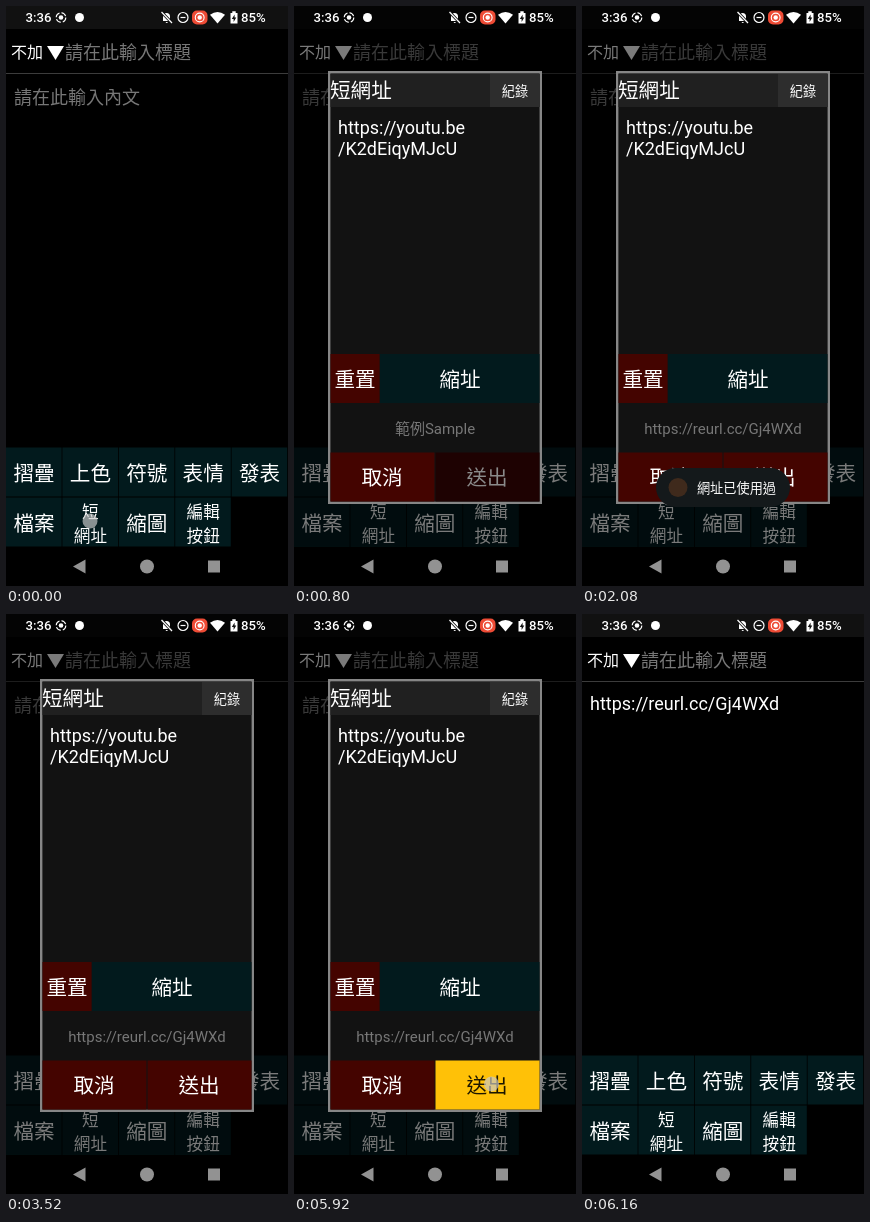
An HTML page that plays this animation: 282x580 px, repeating every 6960 ms.

```html
<!DOCTYPE html>
<html lang="zh-Hant">
<head>
<meta charset="utf-8">
<style>
html, body { margin: 0; width: 100%; height: 100%; overflow: hidden; background: #000; }
svg { display: block; width: 282px; height: 580px; }
text { font-family: Roboto, "Noto Sans CJK TC", "Noto Sans CJK JP", "Noto Sans CJK", sans-serif; }
</style>
</head>
<body>
<svg id="stage" viewBox="0 0 282 580"></svg>
<script>
const LOOP = 6960;
const TEAL = '#021a1d', RED = '#440400', GREY = '#777';
const stage = document.getElementById('stage');

function add(parent, tag, attrs, content) {
  const el = document.createElementNS('http://www.w3.org/2000/svg', tag);
  for (const k in attrs) el.setAttribute(k, attrs[k]);
  if (content) el.textContent = content;
  parent.appendChild(el);
  return el;
}
const group = (parent) => add(parent, 'g', {});
const rect = (p, x, y, width, height, fill, more) =>
  add(p, 'rect', { x, y, width, height, fill, ...more });
const path = (p, d, fill, more) => add(p, 'path', { d, fill, ...more });
const circle = (p, cx, cy, r, fill, more) => add(p, 'circle', { cx, cy, r, fill, ...more });
const ring = (p, x, y, r, w) => circle(p, x, y, r, 'none', { stroke: '#fff', 'stroke-width': w });
const label = (p, x, y, size, str, fill = '#fff', anchor = 'start') =>
  add(p, 'text', { x, y, 'font-size': size, fill, 'text-anchor': anchor }, str);
// Text centred on (x, y)
const middle = (p, x, y, size, str, fill) =>
  label(p, x, y + size * 0.38, size, str, fill, 'middle');
const show = (el, on) => el.setAttribute('visibility', on ? 'visible' : 'hidden');

// Editor page
const page = group(stage);
rect(page, 0, 0, 282, 580, '#000');
label(page, 5, 52, 16, '不加');
path(page, 'M41 40H58L49.5 54Z', '#fff');
label(page, 59, 53, 18, '請在此輸入標題', GREY);
rect(page, 0, 67, 282, 1, '#3c3c3c');
const hint = label(page, 8, 98, 18, '請在此輸入內文', GREY);
const result = label(page, 8, 96, 18, 'https://reurl.cc/Gj4WXd');

const cells = [['摺疊', '上色', '符號', '表情', '發表'], ['檔案', '短|網址', '縮圖', '編輯|按鈕']];
let shortKey;
cells.forEach((row, r) => row.forEach((name, c) => {
  const x = c * 56.4, y = 441.5 + r * 50, parts = name.split('|');
  const key = rect(page, x, y, 55.6, 49, TEAL);
  if (name === '短|網址') shortKey = key;
  if (parts.length === 1) middle(page, x + 28, y + 26, 20.6, name);
  else parts.forEach((s, i) => middle(page, x + 28, y + 14 + i * 24, 16.6, s));
}));
const dim = rect(page, 0, 23, 282, 517, '#000', { opacity: 0.52 });

// Status bar
const status = group(stage);
const bar = rect(status, 0, 0, 282, 23, '#111');
label(status, 19.5, 16, 13.2, '3:36').setAttribute('font-weight', 500);
ring(status, 55, 11.5, 4.8, 1.1).setAttribute('stroke-dasharray', '5.5 2');
circle(status, 55, 11.5, 2.3, '#fff');
circle(status, 73.5, 11.5, 4.5, '#fff');
path(status, 'M157 15V10.5Q157.5 7 160.5 7Q164 7 164 10.5V15ZM159.5 16H162Q160.7 18 159.5 16Z', '#fff');
path(status, 'M155.5 6L166 17', 'none', { stroke: '#111', 'stroke-width': 3 });
path(status, 'M155.5 6L166 17', 'none', { stroke: '#fff', 'stroke-width': 1.2 });
ring(status, 177, 11.5, 5, 1.2);
rect(status, 174.5, 10.9, 5, 1.2, '#fff');
rect(status, 186, 4.5, 15.5, 14, '#ee4b35', { rx: 5 });
ring(status, 193.7, 11.5, 4.4, 1.1);
circle(status, 193.7, 11.5, 2.2, '#fff');
path(status, 'M204 8.8Q211.5 3 219 8.8L211.5 17.5Z', '#fff');
path(status, 'M224.5 7H226.3V5.3H229.7V7H231.5V17.5H224.5Z', '#fff');
path(status, 'M228.6 8.5L225.8 13H227.6V16L230.3 11.5H228.6Z', '#111');
label(status, 235, 16, 13.2, '85%').setAttribute('font-weight', 500);

// Navigation bar
const nav = group(stage);
rect(nav, 0, 541, 282, 39, '#000');
path(nav, 'M67 560.5L79.5 553.5V567.5Z', '#929292');
circle(nav, 141, 560.5, 7, '#929292');
rect(nav, 202, 554.5, 12, 12, '#929292');

// Dialog
const dialog = group(stage);
rect(dialog, 35.2, 66.2, 211.6, 430.6, '#121212', { stroke: '#868686', 'stroke-width': 2.4 });
rect(dialog, 36.5, 68, 209, 33, '#202020');
rect(dialog, 196, 68, 49.5, 33, '#2d2d2d');
label(dialog, 36, 91.5, 20.6, '短網址');
middle(dialog, 221, 85, 13.2, '紀錄');
label(dialog, 44, 128, 18, 'https://youtu.be');
label(dialog, 44, 149, 18, '/K2dEiqyMJcU');
rect(dialog, 36.5, 348, 49, 49, RED);
middle(dialog, 61, 373, 20.6, '重置');
rect(dialog, 86, 348, 159.5, 49, TEAL);
middle(dialog, 166, 373, 20.6, '縮址');
const link = label(dialog, 141, 428, 15, '', GREY, 'middle');
rect(dialog, 36.5, 446.5, 104, 49, RED);
middle(dialog, 88, 471.5, 20.6, '取消');
const send = rect(dialog, 141.5, 446.5, 104, 49, RED);
const sendText = middle(dialog, 193, 471.5, 20.6, '送出');

// Toast
const toast = group(stage);
rect(toast, 74, 462, 134, 39, '#14191b', { rx: 19.5 });
circle(toast, 96, 481.5, 9.5, '#3f2a1c');
middle(toast, 154.5, 481.5, 13.2, '網址已使用過');

const dot = circle(stage, 0, 0, 7.5, '#c8c8c8');

// Touches: start, end, x, y, opacity
const touches = [
  [0, 720, 84, 515, 0.68],
  [720, 800, 84, 516, 0.25],
  [1440, 1840, 191.5, 368.5, 0.68],
  [1840, 2000, 196.5, 369, 0.68],
  [5040, 5920, 197, 470, 0.68],
  [5920, 6000, 197.5, 470, 0.68],
  [6000, 6160, 197.5, 469.5, 0.3]
];

function draw(t) {
  const within = (a, b) => t >= a && t < b;
  const open = within(800, 6000), sent = t >= 6000, done = t >= 2000;
  const sending = within(5920, 6000);

  show(hint, !sent);
  show(result, sent);
  show(dim, open);
  show(dialog, open);
  bar.setAttribute('fill', open ? '#040404' : '#111');
  shortKey.setAttribute('fill', within(560, 800) ? '#b1d316' : TEAL);

  link.textContent = done ? 'https://reurl.cc/Gj4WXd' : '範例Sample';
  send.setAttribute('fill', sending ? '#ffc107' : done ? RED : '#1e0202');
  sendText.setAttribute('fill', sending ? '#1c1600' : done ? '#fff' : '#8a8a8a');

  show(toast, within(2000, 3520));
  toast.setAttribute('opacity', t < 2080 ? 0.5 : 1);

  const touch = touches.find(([a, b]) => within(a, b));
  show(dot, !!touch);
  if (touch) {
    dot.setAttribute('cx', touch[2]);
    dot.setAttribute('cy', touch[3]);
    dot.setAttribute('opacity', touch[4]);
  }
}

const start = performance.now();
function tick(now) {
  draw(Math.max(0, now - start) % LOOP);
  requestAnimationFrame(tick);
}
draw(0);
requestAnimationFrame(tick);
</script>
</body>
</html>
```
